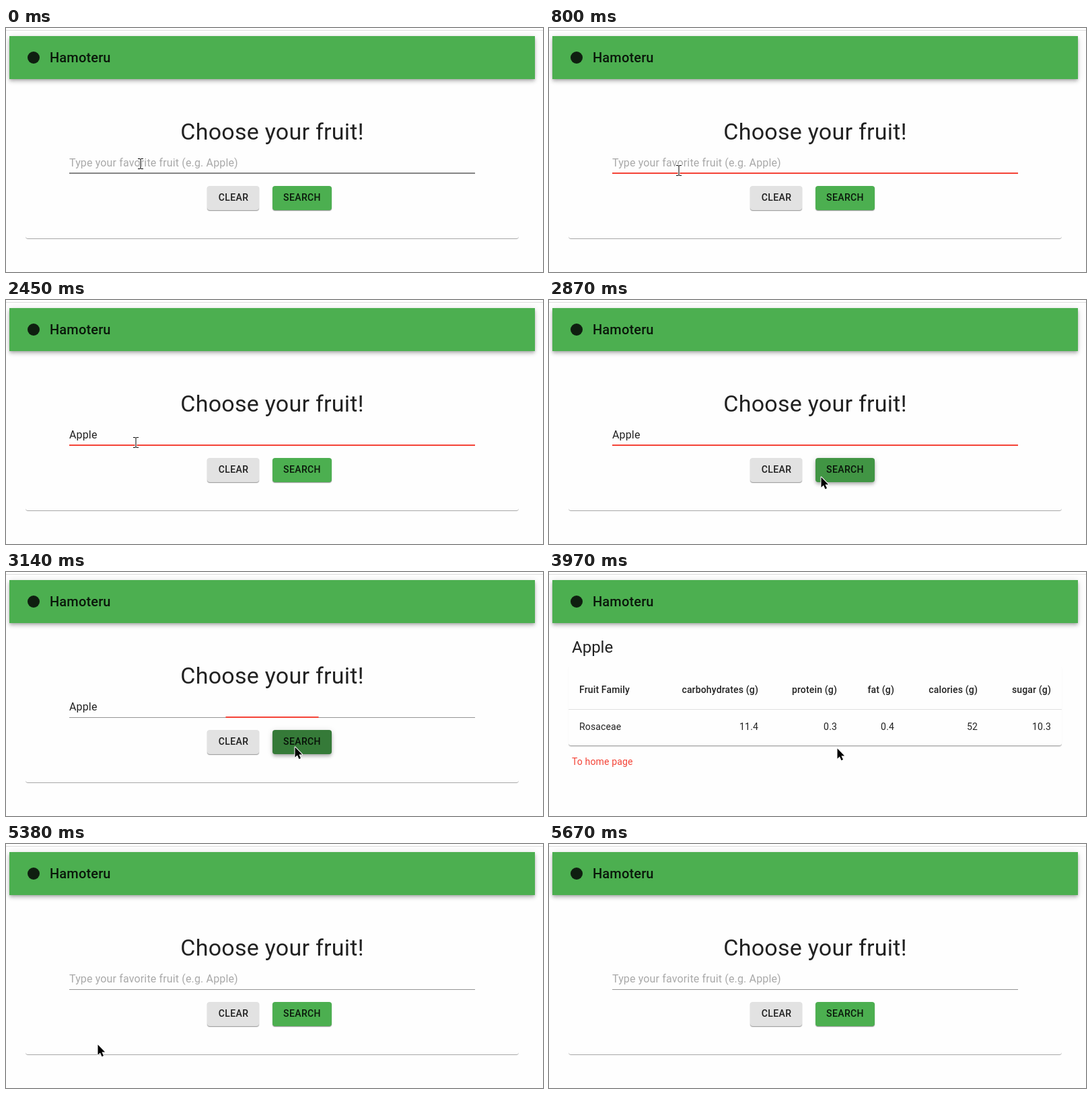
Animation of 798x363 px, one loop 6360 ms. Source, as an HTML page:

```html
<!DOCTYPE html>
<html lang="en">
<head>
<meta charset="utf-8">
<title>Fruit search</title>
<style>
  html, body { margin: 0; width: 100%; height: 100%; overflow: hidden; background: #fefefe; }
  body { position: relative; font-family: Roboto, Arial, sans-serif; }
  div, svg { position: absolute; }
  svg { left: 0; top: 0; }
  text { fill: rgba(0,0,0,.87); font-size: 14px; letter-spacing: .15px; }
  .rule { left: 0; top: 3px; width: 798px; height: 1px; background: #dcdcdc; }
  .bar { left: 5px; top: 12px; width: 781px; height: 64px; background: #4caf50;
    box-shadow: 0 2px 4px -1px rgba(0,0,0,.2), 0 4px 5px rgba(0,0,0,.14), 0 1px 10px rgba(0,0,0,.12); }
  .card { left: 29px; width: 733px; box-sizing: border-box; border-radius: 4px; border-bottom: 1px solid #a8a8a8; }
  .btn { top: 235px; height: 36px; border-radius: 4px;
    box-shadow: 0 1px 1px rgba(0,0,0,.34), 0 1px 2px rgba(0,0,0,.12); }
  .btn.hover { box-shadow: 0 2px 4px -1px rgba(0,0,0,.2), 0 4px 5px rgba(0,0,0,.14), 0 1px 10px rgba(0,0,0,.12); }
  #line, #focus { left: 94px; width: 603px; }
  #focus { top: 215px; height: 2px; background: #f44336; }
  .medium { font-weight: 500; }
  .label { font-weight: 500; letter-spacing: .4px; text-anchor: middle; }
  .field { font-size: 16px; }
  #arrow, #hand, #beam { stroke-linejoin: round; paint-order: stroke; }
</style>
</head>
<body>
<div class="rule"></div>
<div class="bar"></div>

<div id="home">
  <div class="card" style="top:88px;height:226px"></div>
  <div id="line"></div>
  <div id="focus"></div>
  <div id="clear" class="btn" style="left:299px;width:77px"></div>
  <div id="search" class="btn" style="left:396px;width:88px"></div>
</div>
<div id="result">
  <div class="card" style="top:140px;height:119px;box-shadow:0 1px 1px rgba(0,0,0,.14)"></div>
  <div style="left:29px;top:204px;width:733px;height:1px;background:#e0e0e0"></div>
</div>

<svg width="798" height="363">
  <circle cx="41" cy="44" r="9" fill="#0f1f10"/>
  <text class="medium" x="65" y="51" style="font-size:20px">Hamoteru</text>
  <g id="homeText">
    <text x="395.5" y="166" text-anchor="middle" style="font-size:34px;letter-spacing:.25px">Choose your fruit!</text>
    <text id="hint" class="field" x="94" y="206" style="fill:#a9a9a9">Type your favorite fruit (e.g. Apple)</text>
    <text id="typed" class="field" x="94" y="206"></text>
    <rect id="caret" y="191" width="1" height="19"/>
    <text class="label" x="338" y="257">CLEAR</text>
    <text class="label" x="440" y="257">SEARCH</text>
  </g>
  <g id="resultText">
    <text x="34" y="120" style="font-size:24px;letter-spacing:0">Apple</text>
    <g id="table"></g>
    <text id="link" x="34" y="287" style="fill:#f44336">To home page</text>
  </g>
  <g id="pointer" stroke="#fff" stroke-width="2">
    <path id="beam" d="M-4-8h3l1 1 1-1h3v1h-3l-.5.5v13l.5.5h3v1h-3l-1-1-1 1h-3v-1h3l.5-.5v-13l-.5-.5h-3z"/>
    <path id="arrow" d="M.5.5v15.2l3.4-3.3 2.6 5.8 2.5-1.1-2.6-5.6h4.7z"/>
    <g id="hand">
      <path d="M5 2.2q1.7-2.2 3.2 0v5q1.5-.9 2.6.6 1.3-.7 2.3.8 1.6-.4 2.2 1.2v5l-2 3v2.8H6.2v-2.6L.6 11.6q1-2 2.8-.4L5 12.6z"/>
      <path d="M8.4 8v3.5M11 8.8V12M13.2 9.8v2.4" stroke-width=".7"/>
    </g>
  </g>
</svg>

<script>
const $ = id => document.getElementById(id);
const LOOP = 6360;

// Table columns: heading, value, right edge
const columns = [
  ['carbohydrates (g)', '11.4', 311], ['protein (g)', '0.3', 428], ['fat (g)', '0.4', 513],
  ['calories (g)', '52', 637], ['sugar (g)', '10.3', 746]
];
const cell = (s, x, y, attrs) => `<text x="${x}" y="${y}" ${attrs}>${s}</text>`;
$('table').innerHTML = cell('Fruit Family', 45, 180, 'class="medium"') + cell('Rosaceae', 45, 235, '') +
  columns.map(([name, value, x]) =>
    cell(name, x, 180, 'class="medium" text-anchor="end"') + cell(value, x, 235, 'text-anchor="end"')).join('');

const start = {
  page: 'home', pointer: 'beam', at: [200, 202], thick: true, focus: 0, typed: '', caret: 0,
  clear: 0, search: 0, link: false
};

// Each step changes part of the state from its time on; carets are x positions, 0 is hidden.
const steps = [
  [120, { at: [196, 208] }],
  [240, { at: [194, 212], focus: .25, caret: 94 }],
  [400, { focus: .965 }],
  [550, { at: [193, 212], focus: 1 }],
  [800, { caret: 0 }],
  [1230, { typed: 'A', caret: 105 }],
  [1510, { typed: 'Ap', caret: 114 }],
  [1650, { typed: 'App', caret: 123 }],
  [1900, { typed: 'Appl', caret: 127 }],
  [2050, { typed: 'Apple', caret: 136 }],
  [2450, { caret: 0 }],
  [2600, { pointer: 'arrow', at: [282, 240], thick: false }],
  [2720, { at: [356, 262], clear: 1 }],
  [2870, { at: [404, 263], clear: 0, search: .5 }],
  [2990, { at: [428, 260], search: 1, caret: 136 }],
  [3140, { at: [429, 260], focus: .229, caret: 0 }],
  [3260, { page: 'result', at: [428, 260], focus: 0, typed: '', search: 0 }],
  [3970, { at: [428, 262] }],
  [4090, { at: [248, 262] }],
  [4240, { at: [133, 294] }],
  [4390, { at: [125, 297] }],
  [4550, { pointer: 'hand', at: [109, 293], link: true }],
  [4700, { at: [108, 291] }],
  [5380, { page: 'home', pointer: 'arrow', at: [136, 298], link: false }],
  [5530, { at: [574, 358] }],
  [5670, { pointer: '' }]
];

const show = (id, on) => $(id).style.display = on ? '' : 'none';
const mix = (a, b, k) => `rgb(${a.map((v, i) => Math.round(v + (b[i] - v) * k))})`;

function button(id, base, dark, k) {
  $(id).style.background = mix(base, dark, k);
  $(id).classList.toggle('hover', k > 0);
}

function draw(t) {
  const s = Object.assign({}, start, ...steps.filter(([at]) => at <= t).map(([, change]) => change));
  for (const page of ['home', 'result']) {
    show(page, s.page === page);
    show(page + 'Text', s.page === page);
  }
  for (const kind of ['beam', 'arrow', 'hand']) show(kind, s.pointer === kind);
  $('pointer').setAttribute('transform', `translate(${s.at})`);
  $('line').style.cssText = s.thick
    ? 'top:215px;height:2px;background:#858585'
    : 'top:216px;height:1px;background:#949494';
  $('focus').style.transform = `scaleX(${s.focus})`;
  $('typed').textContent = s.typed;
  show('hint', !s.typed);
  show('caret', s.caret);
  $('caret').setAttribute('x', s.caret);
  button('clear', [226, 226, 226], [213, 213, 213], s.clear);
  button('search', [76, 175, 80], [53, 122, 56], s.search);
  $('link').style.textDecoration = s.link ? 'underline' : 'none';
}

const origin = performance.now();
function tick() {
  draw((performance.now() - origin) % LOOP);
  requestAnimationFrame(tick);
}
tick();
</script>
</body>
</html>
```
